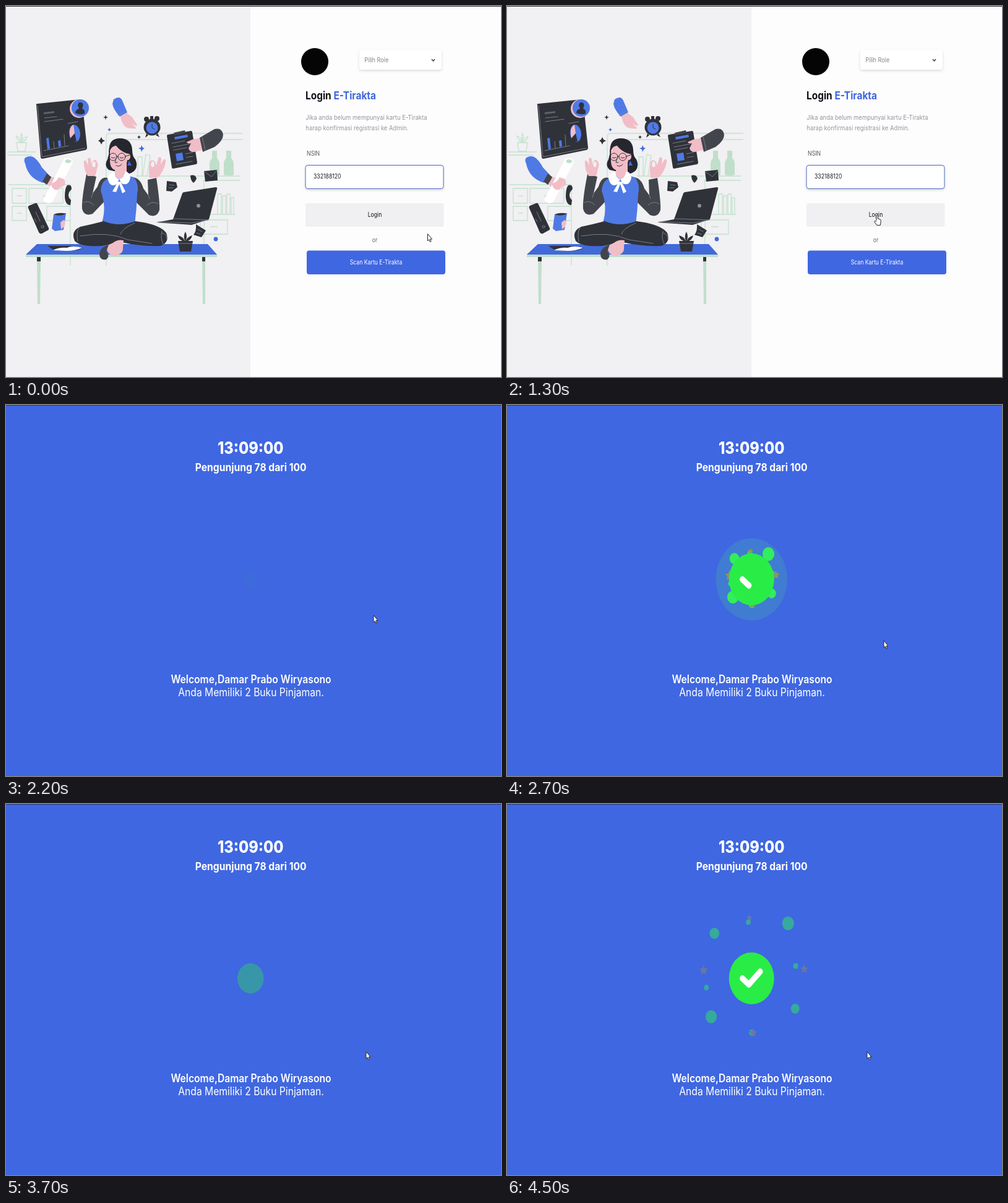
These frames come from a looping animation (800 px wide and 600 px high, 4.6 s). An HTML page:

```html
<!DOCTYPE html>
<html lang="id">
<head>
<meta charset="utf-8">
<title>Login</title>
<style>
html, body { margin: 0; width: 100%; height: 100%; overflow: hidden; background: #fdfdfe }
#stage { display: block; width: 800px; height: 600px }
text { font-family: Inter, "Open Sans", sans-serif; white-space: pre }
.k { fill: #303239 } .h { fill: #26272e } .m { fill: #43454c }
.b { fill: #4169da } .v { fill: #4f7ae6 } .s { fill: #f1bdc7 } .w { fill: #fff } .g { fill: #bfdfcb }
.l { fill: none; stroke: #c3e2cf; stroke-width: 1.3 }
.d { fill: none; stroke: #82858f; stroke-width: .9; stroke-linecap: round }
.o { fill: none; stroke: #303239; stroke-width: 1; stroke-linecap: round }
.cur { fill: #fff; stroke: #24262e; stroke-width: 1; stroke-linejoin: round }
.soft { filter: drop-shadow(0 2px 2px #0002) }
.mid { text-anchor: middle }
</style>
</head>
<body>
<svg id="stage" viewBox="0 0 800 600">
<g id="login">
  <rect width="800" height="600" fill="#fdfdfe"/>
  <rect width="395" height="600" fill="#f1f0f2"/>

  <!-- room -->
  <path class="l" d="M162 420V212Q162 206 168 206H382M190 216H382M2 236H48M2 241H42M210 275H378M318 282H378M300 337H370M4 289H104V420M162 289H150
    M10 295H33V319H10ZM37 295H92V319H37ZM10 324H33V347H10ZM66 324H104V347H66ZM314 346H358V369H314ZM330 357H342M18 307H26M60 307H69M18 335H26M320 282V385
    M213 275V244H220V275M221 275L226 240L233 242L228 275M342 337V304H348V337M350 337V307H355V337M357 337V304H362V337M364 337V310H368V337
    M17 221H33L31 235H19ZM25 221Q18 217 16 210Q23 212 25 221Q23 212 25 206Q28 213 25 221Q27 213 34 211Q32 218 25 221"/>
  <path id="jar" class="g" d="M333 234H341V246Q345 250 345 256V271Q345 274 342 274H332Q329 274 329 271V256Q329 250 333 246Z"/>
  <use href="#jar" x="23"/>

  <!-- table -->
  <path class="g" d="M50 404H56L55 482H51ZM317 404H322V482H318ZM32 402H341V406H32Z"/>
  <path class="k" d="M50 406H56V413H50ZM317 406H322V413H317Z"/>
  <path class="b" d="M50 385H326L341 402H32Z"/>
  <path class="k" d="M67 388H101L124 391Q116 397 98 395L76 394Z"/>
  <path class="w" d="M76 395Q86 390 98 391Q108 387 123 391Q112 396 98 396Z"/>
  <path class="k" d="M278 380H302L299 397H281ZM289 381Q279 379 278 371Q287 373 289 381Q286 371 290 365Q294 373 290 381Q293 373 301 371Q299 380 290 381Z"/>
  <path class="d" d="M279 384H301"/>

  <!-- person -->
  <path class="h" d="M167 236Q165 214 184 214Q203 214 204 233Q204 243 209 248Q214 258 208 266Q200 274 188 270L166 265Q158 258 164 248Z"/>
  <path class="m" d="M164 278Q153 275 148 292L140 303L146 276L130 272Q122 312 123 328Q126 341 140 336L160 315ZM205 277Q217 278 222 295L230 306L229 281L243 278Q249 318 248 330Q244 343 231 338L209 316Z"/>
  <path class="d" d="M125 318Q134 313 142 322M228 322Q237 314 246 320M140 303L138 310M230 306L232 312"/>
  <path class="v" d="M161 281Q181 269 207 277Q216 290 212 304Q211 330 208 354Q181 360 155 350Q163 325 153 299Q154 286 161 281Z"/>
  <path class="s" d="M176 255H195V275Q185 286 176 274Z"/>
  <path class="s" d="M168 230Q176 222 192 228L196 238Q201 237 201 244Q200 250 196 249Q194 266 181 266Q168 266 168 250Z"/>
  <path class="h" d="M166 240Q169 226 178 226Q184 234 194 238L202 240Q204 215 184 215Q165 216 166 240Z"/>
  <g class="o"><circle cx="173" cy="244" r="6"/><circle cx="187" cy="244" r="6"/><path d="M179 243H181M193 243L200 241M170 245Q173 247 176 245M184 245Q187 247 190 245M178 246L176 253H180M178 258Q183 261 187 256"/></g>
  <path class="b" d="M199 250L203 258H196Z"/>
  <path class="w" d="M174 268Q162 273 165 282Q169 294 179 288L183 280L187 287Q198 292 201 278Q201 270 193 267Q190 280 183 280Q176 278 174 268ZM181 284L172 300L178 301L183 288L188 303L193 300L185 284Z"/>
  <path class="s" d="M132 275Q125 263 126 251Q128 248 130 252L133 258L132 247Q135 243 137 248L138 257Q139 248 145 249Q151 255 147 263Q146 270 144 275ZM232 278Q230 264 232 253Q235 246 241 252L243 258L246 246Q249 242 251 247L250 256L255 248Q259 247 258 253Q255 267 246 277Z"/>
  <g fill="#f1f0f2"><ellipse cx="142" cy="256" rx="2.7" ry="4.5"/><ellipse cx="237" cy="256" rx="2.7" ry="4.5"/></g>
  <path class="k" d="M158 348Q182 358 209 348Q249 353 259 367Q265 383 249 388Q216 389 187 382L154 388Q121 390 111 380Q104 364 120 357Q139 353 158 348Z"/>
  <path class="s" d="M190 379Q180 377 173 383L162 388Q163 403 176 404Q190 401 189 391Z"/>
  <path class="m" d="M166 386Q151 391 151 402Q152 412 162 410Q169 405 162 397Z"/>
  <path class="d" d="M118 359Q113 364 116 381M252 364Q249 375 254 385M120 372Q165 364 197 378L236 384M208 351Q187 360 185 369M252 367Q260 368 260 377"/>

  <!-- monitor -->
  <path class="k" d="M49 160Q48 158 51 158L120 151Q123 151 123 154L131 229Q131 232 128 233L59 247Q56 247 56 244Z"/>
  <path class="d" d="M51 161L58 244L128 230M62 181L82 179M62 187L92 183M61 234L101 226M78 230L77 219M95 226L94 208M100 190L116 187"/>
  <path fill="#5f626b" d="M61 172L78 170V173L61 175Z"/>
  <path class="v" d="M65 214L69 213L71 231L67 232ZM84 218L88 217L89 227L85 228Z"/>
  <ellipse class="v" cx="111" cy="206" rx="9" ry="14" transform="rotate(-7 111 206)"/>
  <path class="s" d="M111 206L109 192Q102 195 103 208L104 214Z"/>
  <path class="k" d="M111 206L104 214Q107 222 114 219Z"/>
  <circle class="s" cx="118" cy="166" r="15"/><circle class="v" cx="120" cy="165" r="14"/>
  <path class="k" d="M116 161Q117 155 121 156Q126 157 124 163L123 166Q128 167 127 174Q120 177 112 173Q112 168 118 166Z"/>

  <!-- hands reaching in -->
  <path class="v" d="M174 151Q184 144 188 153L196 172L184 179Q173 167 172 158Z"/>
  <path class="s" d="M185 179L195 173L204 180L212 192Q212 195 208 193L203 190L211 198Q204 199 196 197Q188 194 185 179Z"/>
  <path class="d" d="M181 177L194 170"/>
  <path class="v" d="M31 255Q26 244 38 243Q48 242 58 261L70 274L60 286Q36 279 31 255Z"/>
  <path class="m" d="M66 271L75 278L66 289L59 284Z"/>
  <path class="s" d="M73 277L91 278Q98 283 94 290L82 298Q72 296 67 288Z"/>
  <path class="w" d="M94 247Q101 243 109 251L75 317Q67 322 60 314Z"/>
  <path class="g" d="M96 249Q102 246 106 251Q103 256 96 253Z"/>
  <path class="s" d="M72 287Q81 286 85 277L94 280L85 297Q76 300 72 287Z"/>

  <!-- clock, clipboard -->
  <g class="k"><circle cx="236" cy="196" r="13.5"/><circle cx="227" cy="183" r="4"/><circle cx="244" cy="182" r="4"/><path d="M233 178H238V184H233ZM227 206L225 213L230 209ZM245 206L248 212L242 209Z"/></g>
  <circle class="v" cx="236" cy="197" r="9.500"/><path class="o" d="M236 191V197L240 199"/>
  <path class="k" d="M262 208L299 202Q301 202 301 204L309 253Q309 255 307 256L270 263Q268 263 268 261L260 210Q260 208 262 208Z"/>
  <path class="v" d="M272 212L293 208L294 212L273 216ZM274 239L285 237L287 249L276 251Z"/>
  <path class="d" d="M268 222L289 218M270 228L297 223M271 233L292 229M290 239L301 237M291 245L302 243M275 256L301 251"/>
  <path class="m" d="M271 205L289 201L290 205L272 209Z"/>
  <path class="s" d="M316 213L301 216L292 220Q293 223 299 222L295 230Q297 237 304 236L321 232Z"/>
  <path class="m" d="M313 213L337 199Q349 196 351 208Q351 218 337 228L318 236Z"/>
  <path class="d" d="M317 212L322 233"/>

  <!-- loose objects -->
  <path class="k" d="M99 290Q106 288 106 296L102 301Q99 309 105 314L104 322Q96 322 95 309Q95 294 99 290ZM37 323L47 319Q50 318 51 321L69 359Q70 362 67 363L58 368Q55 369 53 366L36 327Q35 324 37 323Z"/>
  <path class="d" d="M48 333L55 348M46 344L49 349"/><circle cx="59" cy="357" r="2" class="d"/>
  <path class="v" d="M77 337L97 335L93 362L79 364L74 360Z"/><path class="k" d="M77 337Q87 333 97 336Q87 341 77 337Z"/>
  <path class="s" d="M93 346Q98 348 94 357L89 361L88 350Z"/>
  <path class="k" d="M260 283L275 285L277 293L268 300L259 299ZM298 274Q306 272 308 279Q306 284 303 286Q298 282 298 274ZM307 353L323 363L316 374L303 370Q308 364 307 353ZM320 267L341 265L342 282L322 284Z"/>
  <path class="d" d="M264 289L272 290M263 294L270 294M321 268L332 276L341 266M310 361L317 365M308 367L314 369"/>
  <path class="k" d="M285 303Q286 301 288 301L339 293Q342 293 341 296L328 345L300 354L243 350L270 345Z"/>
  <path class="d" d="M272 344L327 346L300 351L246 349"/><circle cx="311" cy="323" r="3" fill="#8c8f98"/>
  <path class="k" d="M154 212L156 216L160 218L156 220L154 224L152 220L149 218L152 216ZM215 209L216 211L218 212L216 213L215 215L214 213L212 212L214 211ZM161 176L162 179L165 180L162 181L161 184L160 181L157 180L160 179Z"/>
  <path class="b" d="M219 225L221 229L224 230L221 232L219 236L218 232L214 230L218 229ZM167 197L168 199L170 200L168 201L167 203L166 201L164 200L166 199Z"/>
  <circle class="b" cx="339" cy="377" r="3.4"/>

  <!-- form -->
  <circle cx="499" cy="90" r="22" fill="#050505"/>
  <rect class="soft w" x="571" y="71" width="133" height="32" rx="4"/>
  <path d="M688 86L690.5 89L693 86" fill="none" stroke="#333" stroke-width="1.3"/>
  <rect class="soft" x="484" y="257.500" width="223" height="38" rx="4" fill="#fff" stroke="#4a68bd"/>
  <rect x="484" y="319" width="223.500" height="38" rx="3" fill="#f0eff1"/>
  <rect x="486" y="395.500" width="224" height="38.500" rx="4" fill="#4067e2"/>
  <svg width="800" height="600" viewBox="0 0 920 600" preserveAspectRatio="none" font-size="10">
    <text x="666" y="91.500" font-size="10.500" fill="#85868c">Pilih Role</text>
    <text x="556.500" y="151" font-size="17.800" font-weight="700" fill="#111217">Login <tspan fill="#4067dc">E-Tirakta</tspan></text>
    <g font-size="10.900" fill="#96979e"><text x="557" y="184.500">Jika anda belum mempunyai kartu E-Tirakta</text><text x="557" y="201">harap konfirmasi registrasi ke Admin.</text></g>
    <text x="559" y="242" fill="#55575e">NSIN</text>
    <text x="571.500" y="279.500" fill="#222">332188120</text>
    <g class="mid"><text x="685.400" y="341.500" fill="#111">Login</text><text x="685.400" y="382" fill="#66676d">or</text><text x="687.700" y="418.500" fill="#fff">Scan Kartu E-Tirakta</text></g>
  </svg>
</g>

<g id="welcome">
  <rect width="800" height="600" fill="#3f67e1"/>
  <svg width="800" height="600" viewBox="0 0 920 600" preserveAspectRatio="none">
    <g class="mid" fill="#fff" font-size="18">
      <text x="454.600" y="79.500" font-size="27" font-weight="800">13:09:00</text>
      <text x="455" y="107" font-weight="700">Pengunjung 78 dari 100</text>
      <text x="455.400" y="450" font-weight="600">Welcome,Damar Prabo Wiryasono</text>
      <text x="455.400" y="471.500">Anda Memiliki 2 Buku Pinjaman.</text>
    </g>
    <g transform="translate(454.500 282)">
      <g id="confetti"></g>
      <circle id="ring" fill="#4cf37b"/>
      <circle id="disc" fill="#2aec47"/>
      <path id="check" d="M-17 0L-5 10L16 -11" pathLength="1" stroke-dasharray="1 2" fill="none" stroke="#fff" stroke-width="10" stroke-linecap="round" stroke-linejoin="round"/>
    </g>
  </svg>
</g>

<rect id="edge" width="800" height="1"/>
<path id="arrow" class="cur" d="M0 0V11.500L2.300 9.200L3.900 13L5.600 12.200L4 8.600H7Z"/>
<path id="hand" class="cur" d="M597 347V339.500Q597 338 598.200 338Q599.500 338 599.500 339.500V344L603 345Q604.500 345.600 604.300 347.500L603.300 354.500H597.600L594 349.500Q593.600 347.500 595.200 347.400L597 349"/>
</svg>
<script>
const LOOP = 4600, STEP = 100, HOVER = 500, SWITCH = 2200, CYCLE = 1450;
const el = id => document.getElementById(id);
const set = (id, attrs) => { for (const k in attrs) el(id).setAttribute(k, attrs[k]); };
const show = (id, on) => { el(id).style.display = on ? '' : 'none'; };
const ramp = (t, a, b) => Math.min(1, Math.max(0, (t - a) / (b - a)));
const mix = (a, b, u) => a + (b - a) * u;
const easeOut = u => 1 - (1 - u) ** 3;

// x, y, radius
const dots = [[-69, -73, 9], [68, -89, 11], [-6, -91, 4.5], [82, -20, 4.8], [-84, 15, 4.5], [81, 49, 8], [-75, 62, 10.5], [1, 88, 5.5]];
const stars = [[-4, -98, 5.5], [-89, -13, 8.5], [98, -15, 7.5], [3, 88, 7.5]];
// time, x, y
const track = [[0, 681.5, 368.5], [300, 675, 365.5], [HOVER, 675, 365.5], [SWITCH, 594, 340], [2500, 594, 340], [2700, 609, 381], [2900, 582, 400.5], [LOOP, 582, 400.5]];

function starPath(r) {
  const pts = Array.from({ length: 10 }, (_, i) => {
    const a = i * Math.PI / 5, d = i % 2 ? r * .48 : r;
    return (d * Math.sin(a)).toFixed(2) + ' ' + (-d * Math.cos(a)).toFixed(2);
  });
  return 'M' + pts.join('L') + 'Z';
}

function addBit([x, y, r], star) {
  const node = document.createElementNS('http://www.w3.org/2000/svg', star ? 'path' : 'circle');
  node.setAttribute(star ? 'd' : 'r', star ? starPath(r) : r);
  node.setAttribute('fill', star ? '#94885f' : '#2eec58');
  el('confetti').append(node);
  return { node, x, y };
}
const bits = [...dots.map(d => addBit(d, false)), ...stars.map(s => addBit(s, true))];

function drawBadge(p) {
  const grow = easeOut(ramp(p, 0, 350));
  set('disc', { r: mix(mix(13, 44, grow), 42, ramp(p, 350, 450)), opacity: mix(.04, 1, ramp(p, 0, 150)) });
  set('ring', { r: 66.5 * easeOut(ramp(p, 120, 350)), opacity: 1 - ramp(p, 380, 520) });

  const drawn = ramp(p, 430, 630);
  show('check', drawn > 0);
  set('check', { 'stroke-dashoffset': 1 - drawn });

  const reach = 1.096 * easeOut(ramp(p, 350, 1250));
  set('confetti', { opacity: p > 350 ? ramp(p, 1050, 650) : 0 });
  for (const { node, x, y } of bits) node.setAttribute('transform', `translate(${x * reach} ${y * reach})`);
}

function drawCursor(t) {
  const hover = t >= HOVER && t < SWITCH;
  show('hand', hover);
  show('arrow', !hover);
  const next = track.findIndex(key => key[0] > t);
  const [t0, x0, y0] = track[next - 1], [t1, x1, y1] = track[next], u = ramp(t, t0, t1);
  set('arrow', { transform: `translate(${mix(x0, x1, u)} ${mix(y0, y1, u)})` });
}

function render(t) {
  const inside = t >= SWITCH;
  show('login', !inside);
  show('welcome', inside);
  set('edge', { fill: inside ? '#22386f' : '#303138' });
  if (inside) drawBadge((t - SWITCH) % CYCLE);
  drawCursor(t);
}

const start = performance.now();
function tick() {
  const t = Math.max(0, performance.now() - start) % LOOP;
  render(Math.floor(t / STEP) * STEP);
  requestAnimationFrame(tick);
}
tick();
</script>
</body>
</html>
```
